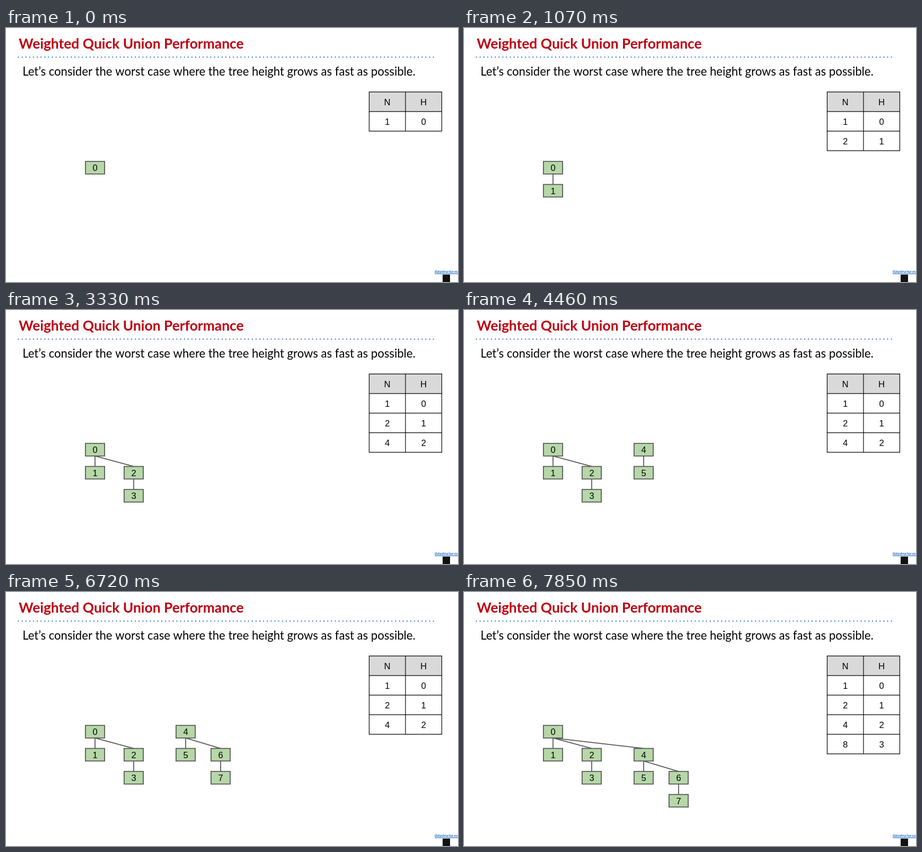
Write an HTML page with a canvas that moves like this. It is 853 px wide and 480 px high and loops after 8000 ms.

```html
<!DOCTYPE html>
<html lang="en">
<head>
<meta charset="utf-8">
<title>Weighted Quick Union Performance</title>
<style>
  html, body { margin: 0; width: 100%; height: 100%; overflow: hidden; background: #fff; }
  canvas { display: block; }
</style>
</head>
<body>
<canvas id="stage" width="853" height="480"></canvas>
<script>
const ctx = document.getElementById('stage').getContext('2d');
const LOOP = 8000;
const LINE = 1.78;
const ARIAL = '16.6px "Liberation Sans", Arial, sans-serif';

// Parent of each node from a given time on; -1 marks a root.
const STEPS = [
  [0, [-1]],
  [1070, [-1, 0]],
  [2200, [-1, 0, -1, 2]],
  [3330, [-1, 0, 0, 2]],
  [4460, [-1, 0, 0, 2, -1, 4]],
  [5590, [-1, 0, 0, 2, -1, 4, -1, 6]],
  [6720, [-1, 0, 0, 2, -1, 4, 4, 6]],
  [7850, [-1, 0, 0, 2, 0, 4, 4, 6]]
];

const COLUMNS = [168, 241, 339, 405];
const HALF_W = 18.1, HALF_H = 11.86;

function text(str, x, y, font, color, align = 'left') {
  ctx.font = font;
  ctx.fillStyle = color;
  ctx.textAlign = align;
  ctx.fillText(str, x, y);
}

function line(x1, y1, x2, y2, color, width) {
  ctx.strokeStyle = color;
  ctx.lineWidth = width;
  ctx.beginPath();
  ctx.moveTo(x1, y1);
  ctx.lineTo(x2, y2);
  ctx.stroke();
}

function drawSlide() {
  ctx.fillStyle = '#fff';
  ctx.fillRect(0, 0, 853, 480);
  text('Weighted Quick Union Performance', 24, 39,
    'bold 26.4px Lato, sans-serif', '#c0000f');
  ctx.setLineDash([LINE, LINE * 3]);
  line(22.5, 55, 808, 55, '#1f6fc4', LINE);
  ctx.setLineDash([]);
  text('Let’s consider the worst case where the tree height grows as fast as possible.',
    31.2, 90, '22.12px Lato, sans-serif', '#000');

  text('datastructur.es', 809, 463, 'bold 6.5px Lato, sans-serif', '#1a66c4');
  line(809, 464.5, 853, 464.5, '#1a66c4', 1);
  ctx.fillStyle = '#111';
  ctx.fillRect(824, 466, 14, 14);
}

function drawTable(height) {
  const left = 685.4, mid = 753.9, right = 822.4, top = 120.9, rowH = 37;
  const border = 1.185;
  const rows = height + 2;
  ctx.fillStyle = '#d9d9d9';
  ctx.fillRect(left, top, right - left, rowH);
  for (let r = 0; r <= rows; r++) {
    const y = top + r * rowH;
    line(left - border / 2, y, right + border / 2, y, '#000', border);
  }
  for (const x of [left, mid, right]) line(x, top, x, top + rows * rowH, '#000', border);
  for (let r = 0; r < rows; r++) {
    const y = 146 + r * rowH;
    text(r ? 2 ** (r - 1) : 'N', 719.6, y, ARIAL, '#000', 'center');
    text(r ? r - 1 : 'H', 788.1, y, ARIAL, '#000', 'center');
  }
}

function drawForest(parents, depths) {
  const nodeX = i => COLUMNS[i >> 1];
  const nodeY = i => 264 + depths[i] * 43.5;

  parents.forEach((p, i) => {
    if (p >= 0) {
      line(nodeX(p), nodeY(p) + HALF_H, nodeX(i), nodeY(i) - HALF_H, '#595959', LINE);
    }
  });
  parents.forEach((p, i) => {
    const x = nodeX(i), y = nodeY(i);
    ctx.beginPath();
    ctx.rect(x - HALF_W, y - HALF_H, HALF_W * 2, HALF_H * 2);
    ctx.fillStyle = '#b6d7a8';
    ctx.fill();
    ctx.strokeStyle = '#595959';
    ctx.lineWidth = LINE;
    ctx.stroke();
    text(i, x, Math.round(y + 6), ARIAL, '#000', 'center');
  });
}

const start = performance.now();

function frame() {
  const t = (performance.now() - start) % LOOP;
  const parents = STEPS.findLast(([from]) => t >= from)[1];
  const depthOf = i => parents[i] < 0 ? 0 : 1 + depthOf(parents[i]);
  const depths = parents.map((_, i) => depthOf(i));

  drawSlide();
  drawTable(Math.max(...depths));
  drawForest(parents, depths);
  requestAnimationFrame(frame);
}
frame();
</script>
</body>
</html>
```
